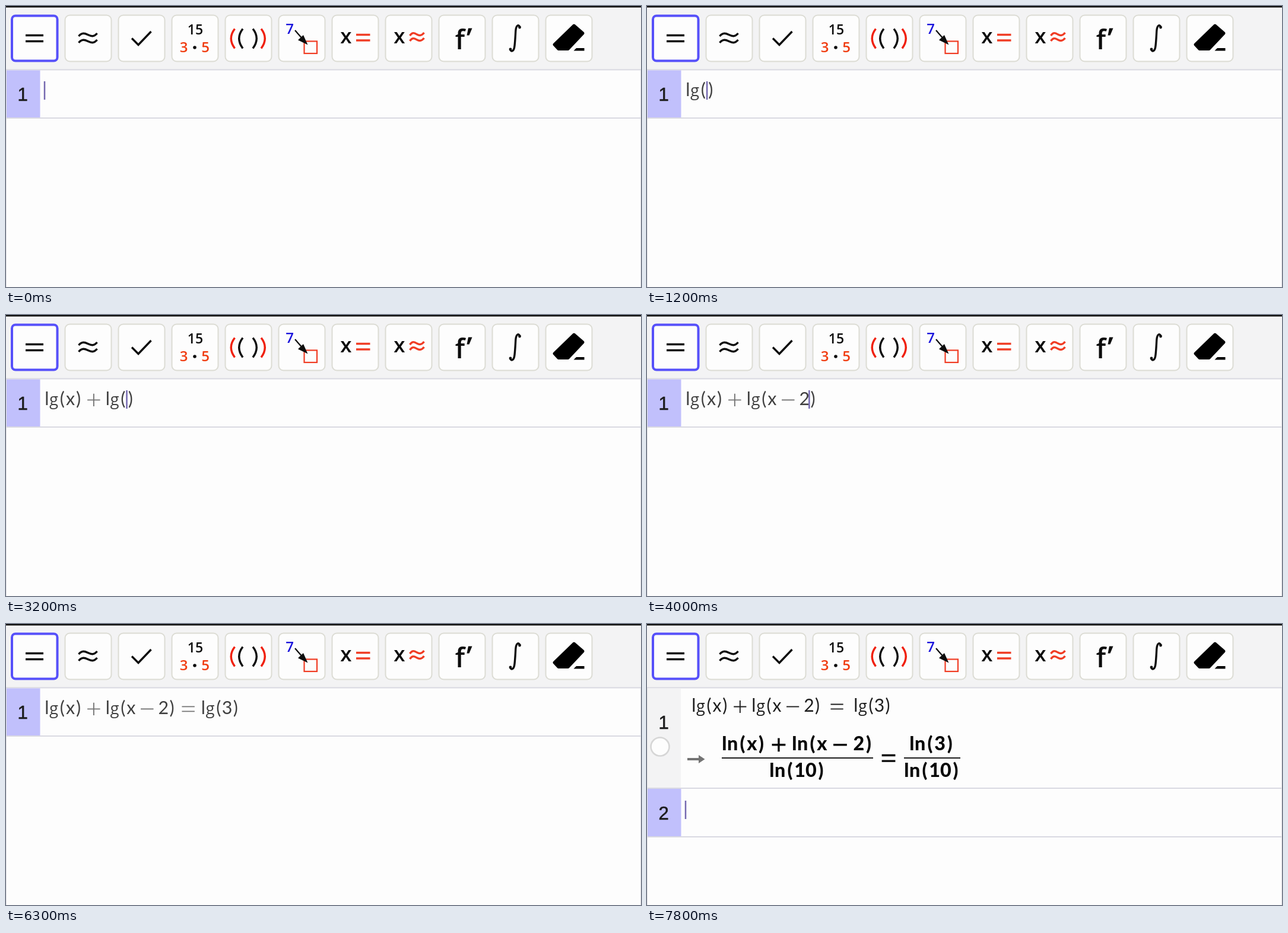
Write an HTML page that moves like this. It is 1070 px wide and 474 px high and loops after 8000 ms.

```html
<!DOCTYPE html>
<html lang="en">
<head>
<meta charset="utf-8">
<title>Equation input</title>
<style>
  html, body { margin: 0; width: 100%; height: 100%; overflow: hidden; background: #fdfdfd; }
  svg { display: block; width: 1070px; height: 474px; }
  text { text-anchor: middle; }
  .line { fill: none; stroke-width: 3.4; }
  .ink { stroke: #0c0c0c; }
  .red { stroke: #f03c24; }
  .rule { stroke: #d9d9e2; stroke-width: 2; }
  .cell { fill: #c1c0fc; }
  .icon { font: 600 24px "Open Sans", sans-serif; fill: #0c0c0c; }
  .num { font: 31px "Liberation Sans", Arial, sans-serif; fill: #1c1c1c; stroke: #1c1c1c; stroke-width: .6; }
  .math { font-family: Lato, sans-serif; }
  .math .g { font-family: "Open Sans", sans-serif; }
  .edit { fill: #404040; stroke: #404040; }
  .plain { fill: #1e1e1e; stroke: #1e1e1e; }
  .bold { fill: #060606; stroke: #060606; font-weight: 800; }
  .math text { stroke: none; }
  .edit path { stroke: #747474; }
</style>
</head>
<body>
<svg viewBox="0 0 1070 474">
  <rect width="1070" height="474" fill="#fdfdfd"/>
  <rect width="1070" height="107" fill="#f3f3f4"/>
  <rect width="1070" height="2.5" fill="#121212"/>
  <path class="rule" d="M0 107.5H1070"/>
  <g id="buttons"></g>

  <g class="line ink">
    <path d="M33 49.5H63M33 59.5H63"/>
    <path d="M122.5 51C128 44 133 46 138 48.5S148 53 153.5 46M122.5 62C128 55 133 57 138 59.5S148 64 153.5 57"/>
    <path d="M212 54.5L223 65.5L244.5 43"/>
    <path d="M399 38.5Q386.5 54.5 399 71.5M416 38.5Q428.5 54.5 416 71.5"/>
    <path d="M487 41L500 56" stroke-width="2.2"/>
    <path d="M866 36C864 30.5 859.5 32 858.8 42C858.2 52 858 58 857 67C856 77 851 78 849.5 73"/>
  </g>
  <g class="line red">
    <path d="M385.5 38.5Q373 54.5 385.5 71.5M430 38.5Q442.500 54.5 430 71.5" stroke="#f0200c"/>
    <rect x="502.5" y="59.5" width="21.5" height="20.5" stroke-width="2.2"/>
    <path d="M590 48.5H613.5M590 58H613.5"/>
    <path d="M680.5 50C685 43 689 46 692.5 48S700 51 704.5 45M680.5 59C685 52 689 55 692.5 57S700 60 704.5 54"/>
  </g>
  <g class="icon">
    <text x="319" y="48" style="font-size:23px">15</text>
    <g fill="#f03c10"><text x="299.5" y="78">3</text><text x="336" y="78">5</text></g>
    <circle cx="318" cy="70" r="2.8"/>
    <text x="478" y="47" fill="#1a14dc">7</text>
    <path d="M508.5 65.5L492 57.5L501 49Z"/>
    <g style="font-size:35px"><text x="573" y="63">x</text><text x="663" y="63">x</text></g>
    <text x="765" y="73" style="font-size:45px">f</text>
    <path d="M779 37.5H785.5L780.5 49.5H776.5Z"/>
    <circle cx="865.5" cy="36" r="2.4"/><circle cx="850" cy="73" r="2.4"/>
    <path d="M957 33L972 46L947 72.5H931L924 65Z" fill="#000" stroke="#000" stroke-width="5" stroke-linejoin="round"/>
    <path d="M956.5 75.5L961 71H974.5V75.5Z" fill="#000"/>
  </g>

  <g id="entry">
    <rect class="cell" y="108.5" width="57.5" height="79.5"/>
    <path class="rule" d="M0 189H1070"/>
    <text class="num" x="28" y="160">1</text>
    <g id="typed" class="math edit"></g>
  </g>

  <g id="answer">
    <rect y="108.5" width="57" height="167.5" fill="#f3f3f4"/>
    <rect class="cell" y="278" width="57.5" height="80"/>
    <path class="rule" d="M0 277H1070M0 359H1070"/>
    <text class="num" x="28" y="177">1</text>
    <text class="num" x="28" y="330">2</text>
    <circle cx="22" cy="207" r="15.5" fill="#fdfdfd" stroke="#d6d6d6" stroke-width="2.6"/>
    <path d="M68 226H87V221L97.5 228L87 235V230H68Z" fill="#747474"/>
    <g id="echo" class="math plain"></g>
    <g id="result" class="math bold"></g>
    <path d="M126 226H381M433 226H528" stroke="#1c1c1c" stroke-width="2"/>
  </g>
  <path id="cursor" stroke="#7468b0" stroke-width="2.5"/>
  <path d="M.5 108V474M1069.5 108V474" stroke="#e2e2e6"/>
</svg>
<script>
const $ = id => document.getElementById(id);

$("buttons").innerHTML = Array.from({ length: 11 }, (_, i) => i
  ? `<rect x="${9.5 + 90 * i}" y="15.5" width="78" height="78" rx="8" fill="#fdfdfd" stroke="#dcdcd4" stroke-width="2"/>`
  : `<rect x="10" y="16.5" width="76.5" height="76" rx="6" fill="#fdfdfd" stroke="#5650fa" stroke-width="4"/>`).join("");

// Cell widths in em; operators include the space around them.
const THIN = { l: .239, n: .517, g: .5, x: .461, "(": .389, ")": .389, "+": 1.222, "-": 1.222, "=": 1.334 };
const HEAVY = { l: .255, n: .561, x: .5, "(": .428, ")": .428, "+": 1.3, "-": 1.3, "=": .856 };

const cell = (c, bold) => bold ? HEAVY[c] || .55 : THIN[c] || .5;
const width = (str, size, bold) => [...str].reduce((sum, c) => sum + cell(c, bold) * size, 0);

function operator(c, x, y, size, bold) {
  const r = size * .335, mid = y - size * .27, gap = size * (bold ? .14 : .125);
  const bar = at => `M${x - r} ${at}h${2 * r}`;
  const d = c === "=" ? bar(mid - gap) + bar(mid + gap)
    : bar(mid) + (c === "+" ? `M${x} ${mid - r}v${2 * r}` : "");
  return `<path d="${d}" stroke-width="${bold ? 3.4 : 1.9}"/>`;
}

function math(str, x, y, size, bold) {
  let out = "";
  for (const c of str) {
    const w = cell(c, bold) * size, mid = x + w / 2;
    out += "+-=".includes(c)
      ? operator(c, mid, y, size, bold)
      : `<text class="${c}" x="${mid}" y="${y}" font-size="${size * (c === "g" ? .86 : .95)}">${c}</text>`;
    x += w;
  }
  return out;
}

$("echo").innerHTML = math("lg(x)+lg(x-2)", 75, 148, 31.6) + math("=", 299, 148, 31.6) + math("lg(3)", 348, 148, 31.6);
$("result").innerHTML = math("ln(x)+ln(x-2)", 126, 213, 34, true) + math("ln(10)", 206, 258, 34, true)
  + math("=", 392.5, 235.5, 34, true) + math("ln(3)", 442, 213, 34, true) + math("ln(10)", 433, 258, 34, true);

const LOOP = 8000, ENTER = 6370, BLINK = 500, SIZE = 32, LEFT = 65;
const KEYS = "lg(x)+lg(x-2)=lg(3)";
const TIMES = [630, 830, 1200, 1400, 1630, 2270, 2630, 2970, 3200, 3440, 3670, 4000, 4270, 4670, 4970, 5130, 5270, 5440, 5700];
let shown = -1;

function draw(t) {
  const count = TIMES.filter(at => at <= t).length;
  const text = KEYS.slice(0, count);
  const done = t >= ENTER;
  if (count !== shown) {
    // An open bracket is closed automatically behind the cursor.
    const tail = text.lastIndexOf("(") > text.lastIndexOf(")") ? ")" : "";
    $("typed").innerHTML = math(text + tail, LEFT, 152, SIZE);
    shown = count;
  }
  $("entry").style.display = done ? "none" : "";
  $("answer").style.display = done ? "" : "none";

  const x = done ? LEFT : LEFT + width(text, SIZE);
  const blinking = !count || t >= 6300;
  const lit = !blinking || Math.floor((t + 200) / BLINK) % 2 === 0;
  $("cursor").setAttribute("d", `M${x} ${done ? 298 : 127}v31`);
  $("cursor").style.display = lit ? "" : "none";
}

function frame() {
  draw(performance.now() % LOOP);
  requestAnimationFrame(frame);
}
frame();
</script>
</body>
</html>
```
